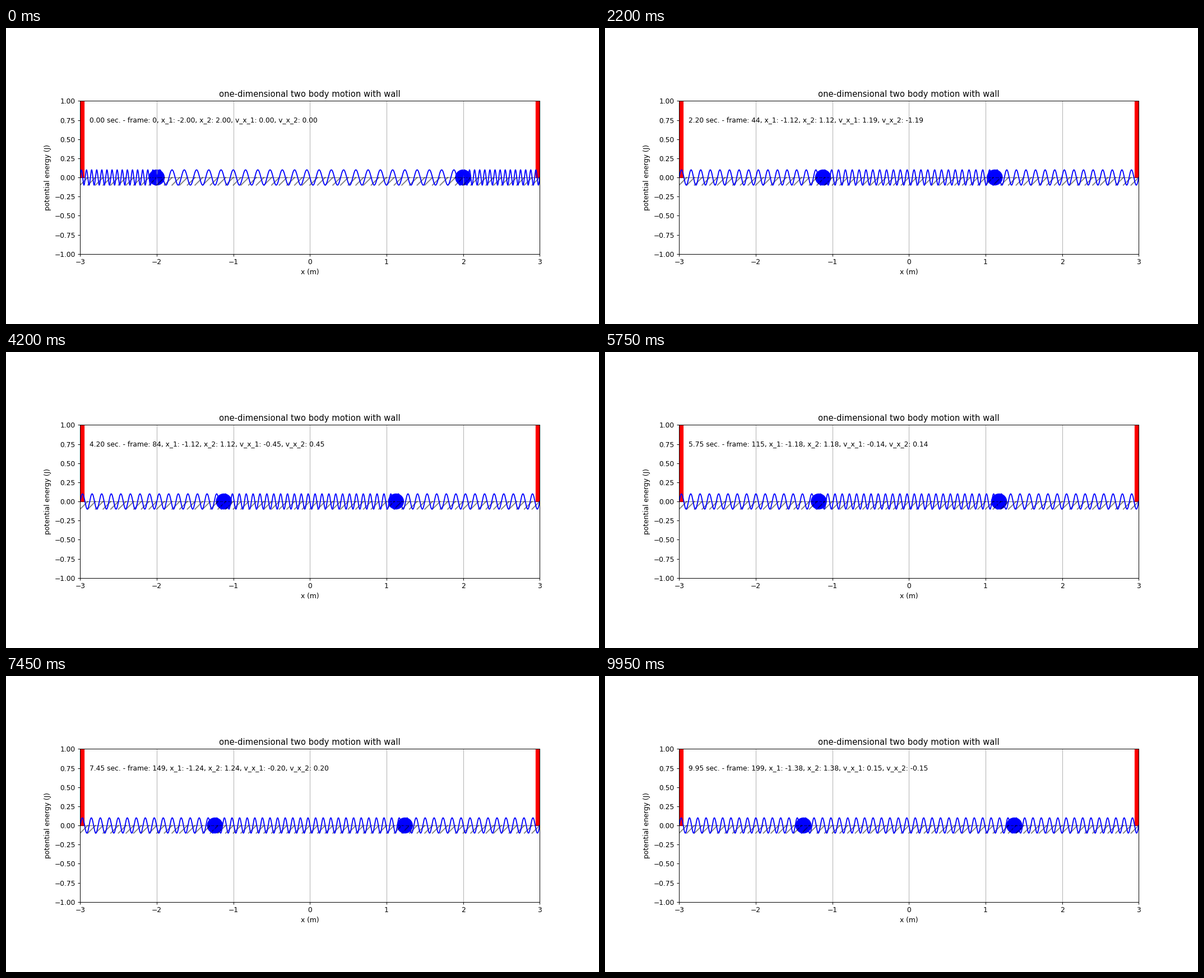
A matplotlib script that plays this animation: 1058 px wide and 529 px high, repeating every 10 s.

```python
import numpy as np
import matplotlib.pyplot as plt
from matplotlib.animation import FuncAnimation
from matplotlib.patches import Circle, Rectangle

FRAMES, INTERVAL = 200, 50
X_MIN, X_MAX = -3.0, 3.0
RADIUS = 0.1
WALL_WIDTH = 0.05

# Damped oscillation of the right body about its rest position
REST, START = 4 / 3, 2.0
STIFFNESS, DECAY = 15.0, 0.25
OMEGA = np.sqrt(STIFFNESS - DECAY**2)

SIDE_TURNS, MIDDLE_TURNS = 15, 25
STEPS = np.linspace(0, 1, 1001)


def right_body(t):
    """Position and velocity of the right body at time t."""
    envelope = (START - REST) * np.exp(-DECAY * t)
    cos, sin = np.cos(OMEGA * t), np.sin(OMEGA * t)
    x = REST + envelope * (cos + DECAY / OMEGA * sin)
    v = -envelope * STIFFNESS / OMEGA * sin
    return x, v + 0.0


def set_spring(line, left, right, turns):
    line.set_data(left + (right - left) * STEPS,
                  RADIUS * np.sin(2 * np.pi * turns * STEPS))


plt.rcParams["font.family"] = "DejaVu Sans"
fig, ax = plt.subplots(figsize=(12, 6), dpi=529 / 6)
ax.set(xlim=(X_MIN, X_MAX), ylim=(-1, 1), aspect="equal",
       xlabel="x (m)", ylabel="potential energy (J)",
       title="one-dimensional two body motion with wall")
ax.grid(axis="x")

for x in (X_MIN, X_MAX - WALL_WIDTH):
    ax.add_patch(Rectangle((x, 0), WALL_WIDTH, 1, color="red"))

# Hatched ground
ax.plot([X_MIN, X_MAX], [0, 0], color="black", alpha=0.5, lw=1)
for x in np.linspace(X_MIN, X_MAX, 60, endpoint=False):
    ax.plot([x, x + 0.1], [-0.1, 0], color="black", alpha=0.5, lw=1.5)

balls = [ax.add_patch(Circle((0, 0), RADIUS, color="blue")) for _ in range(2)]
springs = [ax.plot([], [], color="blue", lw=1.5)[0] for _ in range(3)]
label = ax.text(0.02, 0.9, "", transform=ax.transAxes, va="top")


def update(frame):
    t = frame * INTERVAL / 1000
    x2, v2 = right_body(t)
    x1, v1 = -x2, -v2 + 0.0
    for ball, x in zip(balls, (x1, x2)):
        ball.center = (x, 0)
    set_spring(springs[0], X_MIN, x1, SIDE_TURNS)
    set_spring(springs[1], x1, x2, MIDDLE_TURNS)
    set_spring(springs[2], x2, X_MAX, SIDE_TURNS)
    label.set_text(f"{t:.2f} sec. - frame: {frame}, x_1: {x1:.2f}, x_2: {x2:.2f}, "
                   f"v_x_1: {v1:.2f}, v_x_2: {v2:.2f}")
    return [*balls, *springs, label]


animation = FuncAnimation(fig, update, frames=FRAMES, interval=INTERVAL,
                          repeat=True, repeat_delay=0)
plt.show()
```
